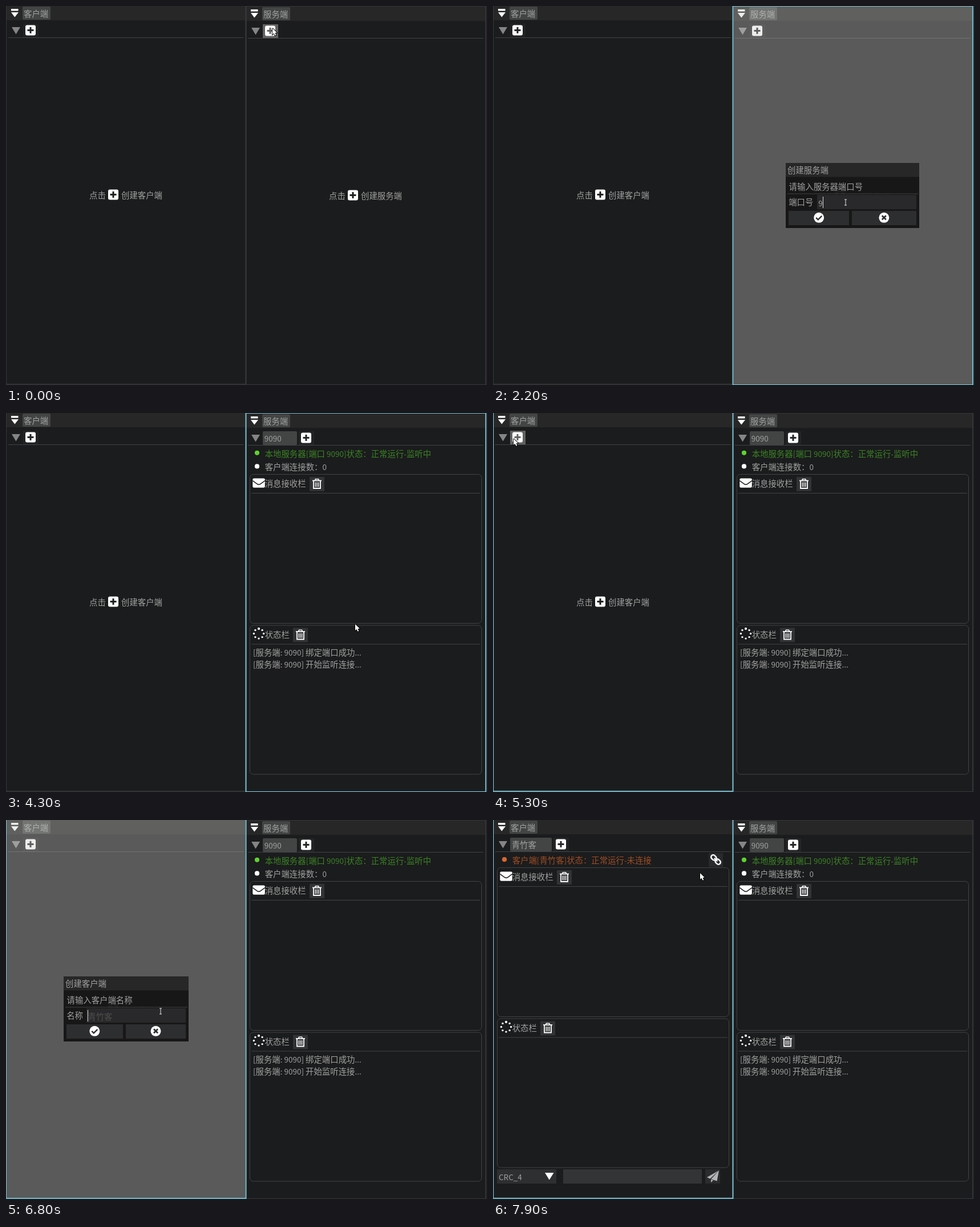
An HTML page with a canvas that plays this animation: 843 by 664 pixels, repeating every 8000 ms.

```html
<!DOCTYPE html>
<html lang="zh">
<head>
<meta charset="utf-8">
<title>客户端与服务端</title>
<style>
html, body { margin: 0; width: 100%; height: 100%; overflow: hidden; background: #1b1c1e; }
canvas { display: block; width: 843px; height: 664px; }
</style>
</head>
<body>
<canvas id="stage" width="843" height="664"></canvas>
<script>
const ctx = document.getElementById('stage').getContext('2d');
const LOOP = 8000, STEP = 100;
const NAME = '青竹客', PORT = '9090';
const BG = '#1b1c1d', BAR = '#272727', TAB = '#434545', LINE = '#424346';
const BTN = '#2d2e30', HOVER = '#505250', PRESS = '#262626';
const TEXT = '#a0a0a0', BLUE = '#78bccf';
const FONT = '"Noto Sans CJK SC", "Noto Sans CJK JP", "Noto Sans CJK", sans-serif';

// Pointer stops: time, x, y
const PATH = [
  [0, 467, 39], [500, 467, 39], [700, 500, 120], [1000, 590, 300], [1300, 618, 344],
  [3200, 618, 344], [3400, 632, 354], [3600, 637, 368], [3900, 613, 371],
  [4100, 612, 370], [4300, 612, 370], [4600, 330, 200], [4900, 40, 48],
  [5000, 36, 45], [5300, 36, 45], [5400, 130, 170], [5500, 260, 327],
  [5800, 276, 341], [5900, 279, 344], [6000, 276, 344], [6700, 276, 344],
  [6900, 266, 326], [7200, 220, 350], [7500, 189, 377], [7600, 188, 377],
  [7700, 196, 366], [7800, 300, 205], [7900, 363, 93], [8000, 363, 93]
];

function pointer(t) {
  let i = 1;
  while (PATH[i][0] < t) i++;
  const [t0, x0, y0] = PATH[i - 1], [t1, x1, y1] = PATH[i];
  const k = (t - t0) / (t1 - t0);
  return { x: x0 + (x1 - x0) * k, y: y0 + (y1 - y0) * k };
}

function box(x, y, x2, y2, color, r = 0) {
  ctx.fillStyle = color;
  ctx.beginPath();
  ctx.roundRect(x, y, x2 - x, y2 - y, r);
  ctx.fill();
}

function poly(points, color) {
  ctx.fillStyle = color;
  ctx.beginPath();
  points.forEach(([x, y]) => ctx.lineTo(x, y));
  ctx.closePath();
  ctx.fill();
}

function stroke(points, color, width) {
  ctx.strokeStyle = color;
  ctx.lineWidth = width;
  ctx.beginPath();
  points.forEach(([x, y], i) => i ? ctx.lineTo(x, y) : ctx.moveTo(x, y));
  ctx.stroke();
}

function dot(x, y, r, color) {
  ctx.fillStyle = color;
  ctx.beginPath();
  ctx.arc(x, y, r, 0, Math.PI * 2);
  ctx.fill();
}

// Latin runs are set a little smaller; returns the end of the line
function text(s, x, midY, color = TEXT) {
  ctx.fillStyle = color;
  for (const run of s.match(/[ -~]+|[^ -~]+/g) || []) {
    ctx.font = `300 ${run[0] <= '~' ? 13.5 : 14.4}px ${FONT}`;
    ctx.fillText(run, x, midY + 5.3);
    x += ctx.measureText(run).width;
  }
  return x;
}

function plusIcon(x, y, hole) {
  box(x - 9, y - 9, x + 9, y + 9, '#fff', 3);
  box(x - 5.5, y - 1.5, x + 5.5, y + 1.5, hole);
  box(x - 1.5, y - 5.5, x + 1.5, y + 5.5, hole);
}

function plusButton(x, y, fill) {
  box(x - 13, y - 12, x + 14, y + 12, fill);
  plusIcon(x, y - .6, fill);
}

function checkIcon(x, y, hole) {
  dot(x, y, 9, '#fff');
  stroke([[x - 5, y], [x - 1.5, y + 3.5], [x + 5, y - 3]], hole, 2.4);
}

function crossIcon(x, y, hole) {
  dot(x, y, 9, '#fff');
  stroke([[x - 3.5, y - 3.5], [x + 3.5, y + 3.5]], hole, 2.8);
  stroke([[x + 3.5, y - 3.5], [x - 3.5, y + 3.5]], hole, 2.8);
}

function trashButton(x, y) {
  box(x - 13, y - 12, x + 13, y + 13, '#323335');
  stroke([[x - 8, y - 5.5], [x + 8, y - 5.5]], '#fff', 1.8);
  stroke([[x - 3.5, y - 6], [x - 2.5, y - 8.3], [x + 2.5, y - 8.3], [x + 3.5, y - 6]], '#fff', 1.6);
  stroke([[x - 6, y - 5], [x - 6, y + 8], [x + 6, y + 8], [x + 6, y - 5]], '#fff', 1.8);
  for (const d of [-2.7, 0, 2.7]) stroke([[x + d, y - 2.5], [x + d, y + 5.5]], '#fff', 1.3);
}

function envelope(x, y) {
  box(x, y, x + 21.5, y + 16.3, '#fff', 2.2);
  stroke([[x, y + 4.2], [x + 8.5, y + 10.3], [x + 10.7, y + 11], [x + 13, y + 10.3], [x + 21.5, y + 4.2]], BG, 1.5);
}

function spinner(x, y) {
  for (let i = 0; i < 8; i++) {
    const a = i * Math.PI / 4;
    dot(x + 8.6 * Math.cos(a), y + 8.6 * Math.sin(a), i === 6 ? 2.1 : 1.7, '#fff');
  }
}

function linkIcon(x, y) {
  ctx.save();
  ctx.translate(x, y);
  ctx.rotate(Math.PI / 4);
  ctx.strokeStyle = '#fff';
  ctx.lineWidth = 2.5;
  for (const d of [-5.2, 5.2]) {
    ctx.beginPath();
    ctx.roundRect(d - 5, -3.7, 10, 7.4, 3.7);
    ctx.stroke();
  }
  stroke([[-4, 0], [4, 0]], '#fff', 2.2);
  ctx.restore();
}

function planeIcon(x, y) {
  const c = '#b4b5b6';
  poly([[x + 10, y - 10], [x - 11, y + 2], [x - 5.5, y + 4.5]], c);
  poly([[x + 10, y - 10], [x - 3.8, y + 5.2], [x + 6.5, y + 8.5]], c);
  poly([[x - 4, y + 6], [x - 4, y + 11], [x, y + 7.3]], c);
}

function header(title) {
  box(0, 0, 420, 25, BAR);
  box(29, 1, 78, 24, TAB, 2);
  text(title, 31, 14);
  box(9, 5, 21.5, 8.5, '#fff');
  poly([[9, 11], [22, 11], [15.3, 19.5]], '#fff');
  poly([[10, 37], [25, 37], [17.5, 49.5]], '#858585');
  box(4, 55, 416.5, 56, LINE);
}

function emptyView(noun, fill) {
  plusButton(43, 43, fill);
  text('点击', 146, 332);
  plusIcon(188, 330.4, BG);
  text('创建' + noun, 202, 332);
}

function group(y, label, drawIcon, trashX) {
  ctx.strokeStyle = LINE;
  ctx.lineWidth = 1;
  ctx.beginPath();
  ctx.roundRect(7.5, y + .5, 406, 261, 6);
  ctx.stroke();
  box(10, y + 33, 411, y + 34, LINE);
  drawIcon();
  text(label, 33.7, y + 17);
  trashButton(trashX, y + 17);
}

function groups(y) {
  group(y, '消息接收栏', () => envelope(12.3, y + 7.5), 125);
  group(y + 264.5, '状态栏', () => spinner(23, y + 279.5), 96);
}

function tab(label, right) {
  box(30, 31, right, 55, TAB, 2);
  text(label, 32.7, 44);
  plusButton(right + 16, 43, '#232426');
}

function serverView() {
  tab(PORT, 90);
  dot(20, 68.8, 4.1, '#5fd32f');
  text(`本地服务器[端口 ${PORT}]状态：正常运行-监听中`, 33.7, 70.3, '#3b8324');
  dot(20, 92.4, 4.1, '#fff');
  text('客户端连接数：0', 33.7, 94);
  groups(106);
  text(`[服务端: ${PORT}] 绑定端口成功...`, 13, 419);
  text(`[服务端: ${PORT}] 开始监听连接...`, 13, 440);
}

function clientView() {
  tab(NAME, 103);
  dot(20, 69.2, 4.1, '#d9682f');
  text(`客户端[${NAME}]状态：正常运行-未连接`, 33.7, 70.5, '#9f4d25');
  box(378, 58, 403, 82, '#292a2c');
  linkIcon(390.5, 69.5);
  groups(83);
  box(7, 612, 111, 637, '#2e2f31');
  text('CRC_4', 10, 625.5);
  poly([[91, 618], [106.5, 618], [98.7, 630.5]], '#fff');
  box(123, 612, 366, 637, '#333436');
  box(372, 612, 398, 637, '#2b2c2e');
  planeIcon(386, 624);
}

// One dialog; f holds its horizontal layout
function dialog(f, value, hint, hasCaret, okFill, noFill) {
  box(f.x, 274, f.x2, 388, 'rgba(20,20,20,.95)');
  box(f.x, 274, f.x2, 298.5, BAR);
  text(f.title, f.x + 3, 287);
  text(f.prompt, f.x + 5.5, 315.7);
  box(f.x + 3, 327.5, f.x2 - 2, 328.5, LINE);
  text(f.label, f.x + 5.2, 342.3);
  box(f.field, 330, f.x2 - 5, 355, '#29292b');
  const left = f.field + 2.3;
  const end = text(value || hint, left, 344.3, value ? TEXT : '#4e4e4e');
  const caretX = Math.round(value ? end : left);
  if (hasCaret) box(caretX, 333, caretX + 1, 353, '#dedede');
  box(f.x + 5, 358, f.ok, 383, okFill);
  box(f.ok + 5, 358, f.x2 - 5, 383, noFill);
  checkIcon(f.check, 369.8, okFill);
  crossIcon(f.cross, 369.8, noFill);
}

const SERVER = { x: 93, x2: 327, field: 148, ok: 204, check: 151.2, cross: 265.3,
  title: '创建服务端', prompt: '请输入服务器端口号', label: '端口号' };
const CLIENT = { x: 101, x2: 320, field: 141, ok: 205, check: 155.3, cross: 262.5,
  title: '创建客户端', prompt: '请输入客户端名称', label: '名称' };

function dim(age) {
  ctx.fillStyle = `rgba(204,207,200,${.35 * Math.min(1, .45 * (1 + age / STEP))})`;
  ctx.fillRect(0, -1, 421, 665);
}

function frameLine(x, y, w, h, color) {
  ctx.strokeStyle = color;
  ctx.lineWidth = 2;
  ctx.strokeRect(x, y, w, h);
}

function arrow({ x, y }) {
  const shape = [[0, 0], [0, 11], [2.5, 8.7], [4.4, 12.8], [6.3, 12], [4.6, 8], [7.8, 7.8]]
    .map(([a, b]) => [x + a, y + b]);
  stroke([...shape, shape[0]], '#000', 1.8);
  poly(shape, '#fff');
}

function beam({ x, y }) {
  stroke([[x, y - 5], [x, y + 5]], '#e8e8e8', 1);
  for (const d of [-5, 5]) stroke([[x - 2, y + d], [x + 2, y + d]], '#e8e8e8', 1);
}

const inside = (p, x, y, x2, y2) => p.x >= x && p.x < x2 && p.y >= y && p.y < y2;
const between = (t, a, b) => t >= a && t < b;

function buttonFill(p, x, x2, y, pressed) {
  if (!inside(p, x, y, x2, y + 25)) return BTN;
  return pressed ? PRESS : HOVER;
}

function plusFill(p, x, pressed) {
  if (!inside(p, x, 31, x + 27, 56)) return '#212224';
  return pressed ? PRESS : '#626262';
}

function leftPane(t, p) {
  header('客户端');
  if (t >= 7700) return clientView();
  const open = t >= 5400;
  emptyView('客户端', open ? '#212224' : plusFill(p, 30, t === 5200));
  if (!open) return;
  dim(t - 5400);
  dialog(CLIENT, '', NAME, t >= 5900,
    buttonFill(p, 106, 205, 358, t >= 7600), buttonFill(p, 210, 315, 358, false));
}

function rightPane(t, p) {
  header('服务端');
  if (t >= 4300) return serverView();
  const open = t >= 500;
  emptyView('服务端', open ? '#212224' : plusFill(p, 450, t >= 300));
  if (!open) return;
  dim(t - 500);
  const typed = t < 2200 ? 0 : t < 2300 ? 1 : t < 2500 ? 2 : 4;
  dialog(SERVER, PORT.slice(0, typed), PORT, t >= 1300,
    buttonFill(p, 518, 624, 359, t >= 4200), buttonFill(p, 629, 742, 359, false));
}

function clipPane(x, y, w, h, draw) {
  ctx.save();
  ctx.beginPath();
  ctx.rect(x, y, w, h);
  ctx.clip();
  draw();
  ctx.restore();
}

function draw(t) {
  const p = pointer(t);
  box(0, 0, 843, 664, BG);
  clipPane(0, 0, 420, 663, () => leftPane(t, p));
  clipPane(421, 0, 420, 664, () => {
    ctx.translate(420, 1);
    rightPane(t, p);
  });

  const leftFocus = t >= 5200, rightFocus = between(t, 300, 5200);
  const left = [.2, -2, 420.3, 664.8], right = [420.5, 0, 420.4, 663.8];
  frameLine(...left, '#353638');
  frameLine(...right, '#353638');
  if (leftFocus) frameLine(...left, BLUE);
  if (rightFocus) frameLine(...right, BLUE);

  const overField = between(t, 500, 4300) && inside(p, 568, 331, 742, 356)
    || between(t, 5400, 7700) && inside(p, 141, 330, 315, 355);
  (overField ? beam : arrow)(p);
}

const start = performance.now();
function tick(now) {
  const t = Math.max(0, now - start) % LOOP;
  draw(Math.floor(t / STEP) * STEP);
  requestAnimationFrame(tick);
}
draw(0);
requestAnimationFrame(tick);
</script>
</body>
</html>
```
